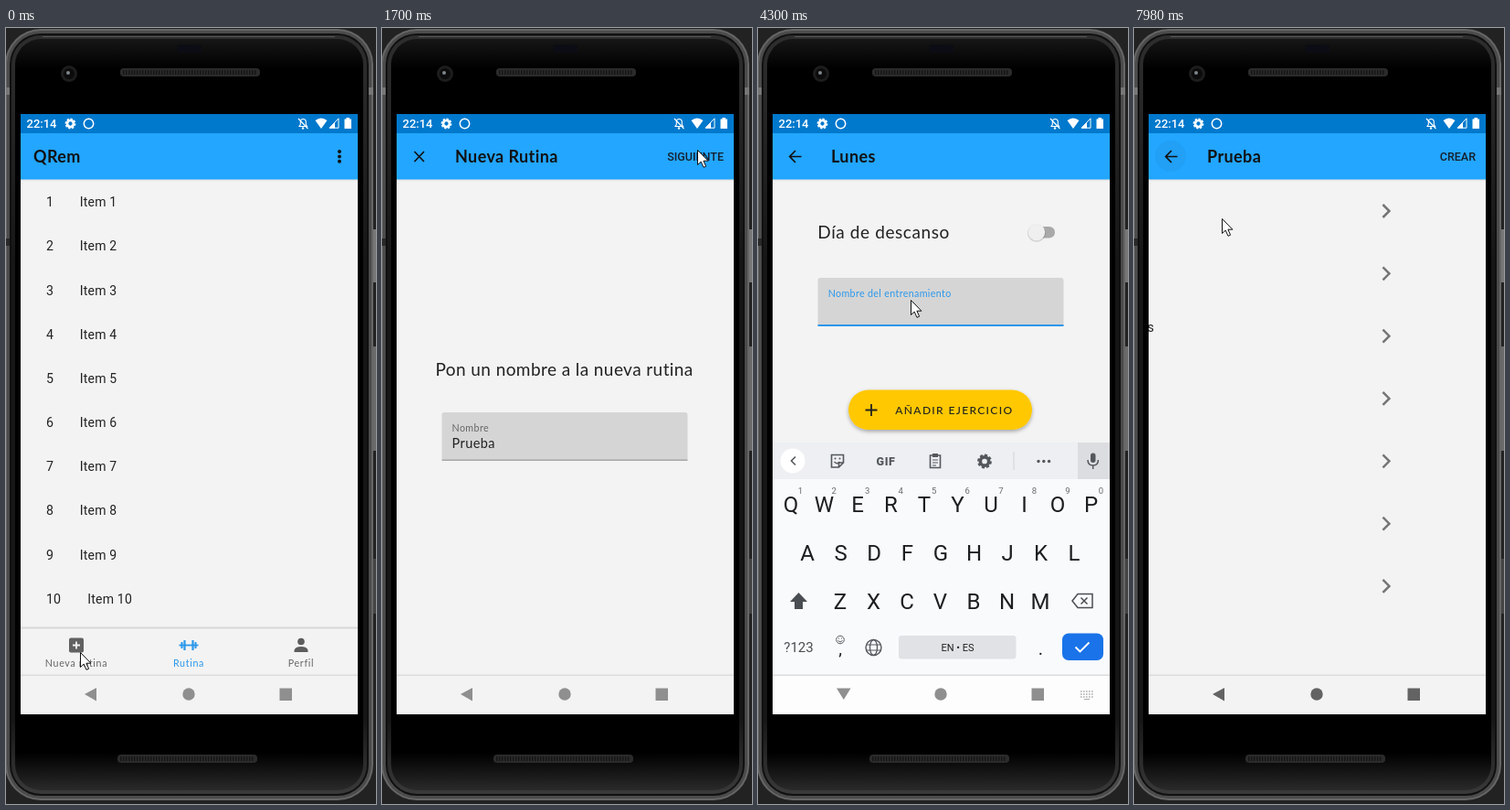
These frames come from a looping animation (405 by 848 pixels, 8 s). An HTML page:

```html
<!DOCTYPE html>
<html lang="es">
<head>
<meta charset="utf-8">
<title>Rutina</title>
<style>
html, body { margin: 0; width: 100%; height: 100%; overflow: hidden; background: #222; }
svg { display: block; width: 100%; height: 100%; }
text { white-space: pre; }
.r { font-family: Roboto, sans-serif; }
.m { font-family: Roboto, sans-serif; font-weight: 500; }
.l { font-family: Lato, sans-serif; }
.b { font-family: Lato, sans-serif; font-weight: 700; letter-spacing: .4px; }
</style>
</head>
<body>
<svg id="stage" viewBox="0 0 405 848"></svg>
<script>
const LOOP = 8000;
const BG = '#f3f3f3', BAR = '#22a6ff', STATUS = '#0078cc', BLUE = '#2b97ea', INK = '#222', GREY = '#666';

// Markup helpers
const rect = (x, y, w, h, fill, extra = '') =>
  `<rect x="${x}" y="${y}" width="${w}" height="${h}" fill="${fill}" ${extra}/>`;
const circ = (x, y, r, fill, extra = '') => `<circle cx="${x}" cy="${y}" r="${r}" fill="${fill}" ${extra}/>`;
const path = (d, fill, extra = '') => `<path d="${d}" fill="${fill}" ${extra}/>`;
const line = (d, color, w = 1.5, extra = '') => path(d, 'none', `stroke="${color}" stroke-width="${w}" ${extra}`);
const text = (x, y, s, size, cls = 'r', fill = INK, extra = '') =>
  `<text x="${x}" y="${y}" font-size="${size}" class="${cls}" fill="${fill}" ${extra}>${s}</text>`;
const mid = 'text-anchor="middle"';
const group = (id, body, extra = '') => `<g id="${id}" ${extra}>${body}</g>`;
const many = (n, fn) => Array.from({ length: n }, (_, i) => fn(i)).join('');
const gear = (x, y, r, color) =>
  circ(x, y, r * .58, 'none', `stroke="${color}" stroke-width="${r * .45}"`) +
  circ(x, y, r * .84, 'none', `stroke="${color}" stroke-width="${r * .3}" pathLength="16" stroke-dasharray="1.2 .8"`);
const appBar = () => rect(16, 165, 369, 3, 'url(#shade)') + rect(16, 115, 369, 50.5, BAR);

function phone() {
  const speaker = (x, y) => rect(x, y, 153, 9, '#2b2b2b', 'rx="4"') +
    line(`M${x + 3} ${y + 4.5}h147`, '#161616', 5, 'stroke-dasharray="1.5 1.5"');
  const shell = (inset, fill) =>
    rect(inset - 1, inset + 1, 403 - 2 * inset, 843 - 2 * inset, fill, `rx="${39 - inset}"`);
  return rect(0, 0, 405, 848, '#222') +
    rect(401, 220, 4, 58, '#777') + rect(401, 348, 4, 114, '#6a6a6a') + rect(401, 580, 4, 60, '#444') +
    shell(0, '#666') + shell(2, '#4b4b4b') +
    rect(0, 230, 5, 8, '#292929') + rect(0, 65, 5, 8, '#777') + rect(397, 65, 5, 8, '#777') +
    shell(5, '#101010') + shell(7, 'url(#glass)') + shell(11, 'url(#face)') +
    line('M40 9.5H360', '#555', 1.2) +
    speaker(125, 44) + speaker(122, 794) +
    rect(187, 18, 27, 9, '#0c0d14', 'rx="3"') +
    circ(69, 50, 9, '#1d1d1d') + circ(69, 50, 6, '#0b0b0b') + circ(68, 49, 2, '#7d878b');
}

function statusIcons() {
  return text(22.5, 109, '22:14', 13, 'm', '#fff') + gear(70.5, 104.5, 6, '#fff') +
    circ(90.5, 104.5, 5.2, 'none', 'stroke="#fff" stroke-width="1.5"') +
    path('M321 107.5h8.5l-1.2-2v-3q0-3-3-3t-3 3v3z', 'none', 'stroke="#fff" stroke-width="1.1"') +
    line('M320 99l10.5 11', '#fff', 1.2) + circ(325, 109.5, 1.2, '#fff') +
    path('M338.5 101q6.5-5 13 0l-6.5 9z', '#fff') +
    line('M364 98.8v10.4h-10z', '#fff', 1) + path('M360 103.5v6h-6z', '#fff') +
    path('M370.5 99.5h2v-1.5h3.5v1.5h2v10.5h-7.5z', '#fff');
}

function homeScreen() {
  const row = i => {
    const y = 195.3 + 48.15 * i;
    return text(44, y, i + 1, 14.2) + text(i < 9 ? 80.8 : 89.3, y, 'Item ' + (i + 1), 14, 'r', INK, 'letter-spacing=".2"');
  };
  const tab = (x, s, color) => text(x, 697.5, s, 10.7, 'l', color, mid + ' letter-spacing=".65"');
  return rect(16, 94, 369, 656, BG) + appBar() +
    text(30, 147, 'QRem', 18, 'b', '#111') + many(3, i => circ(365, 135 + i * 5.4, 2, '#111')) +
    many(10, row) + rect(16, 655, 369, 52, BG) + rect(16, 654.5, 369, 2, '#d8d8d8') +
    rect(69, 666.5, 16, 16, '#616161', 'rx="2"') + line('M77 670.5v8M73 674.5h8', BG, 1.8) +
    line('M189.500 674.500h21', BLUE, 1.8) +
    line('M192.500 671v7M207.500 671v7', BLUE, 2) + line('M195.500 669v11M204.500 669v11', BLUE, 2.2) +
    circ(323, 670.5, 3.8, '#5c5c5c') + path('M315.5 682v-2q1-4 7.5-4t7.5 4v2z', '#5c5c5c') +
    tab(77, 'Nueva rutina', GREY) + tab(200, 'Rutina', BLUE) + tab(323, 'Perfil', GREY);
}

const field = y => path(`M65.5 ${y + 52}v-49q0-3 3-3h263q3 0 3 3v49z`, '#d5d5d5');

const namePage = () => text(58.5, 380, 'Pon un nombre a la nueva rutina', 19, 'l', INK, 'letter-spacing=".42"') +
  field(420) + rect(65.5, 471.7, 269, 1, '#888') +
  text(76.5, 440.5, 'Nombre', 10.7, 'l', GREY, 'letter-spacing=".4"') +
  text(76.5, 458.5, 'Prueba', 14.5, 'l', INK, 'letter-spacing=".4"');

const weekPage = () => ['Lunes', 'Martes', 'Miércoles', 'Jueves', 'Viernes', 'Sábado', 'Domingo'].map((d, i) => {
  const y = 68.33 * i;
  return text(29.3, 195.3 + y, d, 14.4, 'r', INK, 'letter-spacing=".3"') +
    text(29.5, 215.5 + y, '-', 12.5, 'r', '#777') +
    line(`M345 ${193 + y}l7 7l-7 7`, '#757575', 2.5);
}).join('');

const dayPage = () => text(65.3, 229.5, 'Día de descanso', 19, 'l', INK, 'letter-spacing=".6"') +
  rect(299, 217, 26, 12.5, '#a9a9a9', 'rx="6.2"') +
  circ(305, 224, 10, '#000', 'opacity=".13"') + circ(305, 223, 9.2, '#efefef') +
  field(273) + group('edge', rect(65.5, 324.5, 269, 1, '#888')) + group('focus', rect(65.5, 324, 269, 2, BLUE)) +
  `<text id="label" class="l" font-size="10.7" letter-spacing=".35">Nombre del entrenamiento</text>` +
  `<text id="typed" class="l" x="76.5" y="311.8" font-size="14.5" letter-spacing=".3" fill="${INK}"></text>` +
  group('under', rect(76.5, 313.6, 42.5, 1, '#333')) +
  group('add', rect(99, 395.5, 201, 43.5, '#ffc800', 'rx="21.75" filter="url(#drop)"') +
    line('M124 411v13M117.5 417.5h13', INK, 1.8) +
    text(150.3, 422, 'AÑADIR EJERCICIO', 12, 'l', INK, 'letter-spacing="1.35" font-weight="500"'));

function keyboard() {
  const rows = [['qwertyuiop', 36, 528], ['asdfghjkl', 54, 581], ['zxcvbnm', 90, 634]];
  const letters = up => rows.map(([s, x, y]) => [...(up ? s.toUpperCase() : s)].map((c, i) =>
    text(x + i * 36.5, y + (up ? 1 : 0), c, 24, 'r', '#1d1e20', mid)).join('')).join('');
  const shift = 'M44.5 617l9.5 10h-5v8h-9v-8h-5z';
  const dark = '#54585d';
  const tools = line('M41 468.5l-4.5 4.5l4.5 4.5', dark, 1.6) +
    line('M80.5 466.5h13v8.5l-5 5h-8zM93.5 475h-5v5', dark, 1.6) +
    circ(84.5, 470.5, 1, dark) + circ(89.5, 470.5, 1, dark) + line('M83.5 474q3.5 3.5 6 0', dark, 1.3) +
    text(140, 477.5, 'GIF', 12.5, 'r', dark, mid + ' font-weight="900" letter-spacing=".6"') +
    line('M188.5 467h11v13.5h-11z', dark, 1.6) + rect(191, 465, 6, 4, dark) +
    line('M191 472h6M191 475h6M191 478h4', dark, 1) + gear(248, 473.5, 8, dark) +
    rect(279.5, 463, 1, 20, '#d2d5d8') + many(3, i => circ(307 + i * 5.8, 473.5, 1.7, dark));
  const hints = line('M36 468.5l4.5 4.5l-4.5 4.5', dark, 1.6) +
    [97, 199, 301].map(x => text(x, 479.5, '', 16, 'r', '#5a5d61', mid + ' data-hint=""')).join('') +
    rect(144.5, 462, 1, 22, '#c6c9cc') + rect(252.5, 462, 1, 22, '#c6c9cc');
  return rect(16, 453, 369, 254, '#f9fafc') + rect(16, 453, 369, 40, '#edeff2') + rect(350, 453, 35, 40, '#dcdde0') +
    circ(38, 473, 13.5, '#fff') + group('tools', tools) + group('hints', hints) +
    rect(364, 464.5, 5.5, 10.5, dark, 'rx="2.7"') + line('M361 472q0 6 5.7 6t5.7-6M366.7 478v4', dark, 1.5) +
    many(10, i => text(46.5 + i * 36.55, 508.5, (i + 1) % 10, 9.5, 'r', '#666a6e', mid)) +
    group('upper', letters(true) + path(shift, '#4a4d51')) +
    group('lower', letters(false) + line(shift, '#4a4d51', 1.5)) +
    line('M350 618.5h16v15h-16l-6-7.5zM353.5 622.5l7 7M360.5 622.5l-7 7', '#4a4d51', 1.5) +
    text(44.5, 682, '?123', 15, 'r', '#4a4d51', mid) +
    circ(90, 668.5, 4.3, 'none', `stroke="${dark}"`) + line('M87.5 669.5q2.5 3 5 0M88.5 666.5v1M91.5 666.5v1', dark, 1) +
    text(90, 685, ',', 19, 'r', INK, mid) +
    circ(126.5, 677, 8.5, 'none', `stroke="${dark}" stroke-width="1.4"`) +
    `<ellipse cx="126.5" cy="677" rx="4" ry="8.5" fill="none" stroke="${dark}" stroke-width="1.3"/>` +
    line('M119 674h15M119 680h15', dark, 1.2) +
    rect(154, 664, 128.5, 25.5, '#e1e2e5', 'rx="3"') + text(218.5, 681, 'EN • ES', 11, 'r', '#222', mid) +
    text(309.5, 685, '.', 20, 'r', INK, mid) +
    rect(333, 661.5, 45, 29.5, '#1a73e8', 'rx="7"') + line('M347.5 676.5l5 5l10-10', '#fff', 1.9);
}

const navBar = () => group('navBg', rect(16, 707, 369, 43, '#fdfdfd')) +
  group('navLine', rect(16, 706.5, 369, 1.5, '#dcdcdc')) +
  group('navIcons', path('M86 728l13-7v14.5z', '', 'id="back"') +
    path('M86 721.5h15.5l-7.7 12.5z', '', 'id="hide"') +
    '<circle cx="200" cy="728" r="6.7"/><rect x="299.5" y="721.5" width="13.5" height="13.5"/>') +
  group('kbIcon', many(3, i => line(`M353 ${725 + i * 3}h14`, '#aaa', 1.5, 'stroke-dasharray="1.6 1.4"')) +
    line('M357 733.5h6', '#aaa', 1));

const header = () => rect(16, 94, 369, 21, STATUS) + appBar() +
  group('close', line('M35.5 135l10.5 11M46 135l-10.5 11', '#111', 1.7)) +
  group('ripple', circ(40, 140, 17, '#000', 'opacity=".04"')) +
  group('arrow', line('M47.5 140.5h-12.5M41 134l-6.3 6.5l6.3 6.5', '#111', 1.7)) +
  `<text id="title" class="b" x="80" y="147" font-size="18" fill="#111"></text>` +
  `<text id="action" class="m" x="374" y="145" font-size="12.5" text-anchor="end" fill="#15202b"></text>`;

const clip = (id, y, h) => `<clipPath id="${id}"><rect x="16" y="${y}" width="369" height="${h}"/></clipPath>`;
const stage = document.getElementById('stage');
stage.innerHTML = `<defs>
  ${clip('screen', 94, 656)}${clip('body', 165, 542)}${clip('keys', 453, 254)}
  <linearGradient id="glass" x2="0" y2="1"><stop stop-color="#2e2e2e"/><stop offset=".3" stop-color="#161616"/>
    <stop offset=".9" stop-color="#161616"/><stop offset="1" stop-color="#3a3a3a"/></linearGradient>
  <linearGradient id="face" x2="0" y2="1"><stop stop-color="#161616"/><stop offset=".04"/>
    <stop offset=".95"/><stop offset="1" stop-color="#2a2a2a"/></linearGradient>
  <linearGradient id="shade" x2="0" y2="1"><stop stop-color="#dcdcdc"/><stop offset="1" stop-color="${BG}"/></linearGradient>
  <filter id="drop" x="-10%" y="-20%" width="120%" height="160%">
    <feDropShadow dx="0" dy="2" stdDeviation="2" flood-opacity=".33"/></filter></defs>` +
  phone() +
  group('screenBox', homeScreen() +
    group('flow', rect(16, 115, 369, 640, BG) +
      group('pages', group('name', namePage()) + group('week', weekPage()) + group('day', dayPage()), 'clip-path="url(#body)"') +
      header()) +
    rect(16, 94, 369, 21, STATUS, 'id="statusBg"') + statusIcons() +
    group('keyBox', group('kb', keyboard()), 'clip-path="url(#keys)"') + navBar(), 'clip-path="url(#screen)"') +
  group('pointer', circ(0, 0, 12, '#fbf75a', 'id="press" opacity=".85"') +
    path('M.5 .5V16.5l3.7-3.4l2.8 6.2l2.6-1.1l-2.7-6h5z', '#fff', 'stroke="#111" stroke-width="1"'));

const $ = Object.fromEntries([...stage.querySelectorAll('[id]')].map(e => [e.id, e]));
const hintNodes = stage.querySelectorAll('[data-hint]');

const ramp = (t, start, dur) => Math.min(1, Math.max(0, (t - start) / dur));
const ease = (t, start, dur = 400) => (1 - Math.cos(Math.PI * ramp(t, start, dur))) / 2;
const within = (t, spans) => spans.some(([a, b]) => t >= a && t < b);
const show = (e, on) => { e.style.display = on ? '' : 'none'; };
const move = (e, x, y) => e.setAttribute('transform', `translate(${x.toFixed(2)} ${y.toFixed(2)})`);

// Pointer route: time, x, y
const ROUTE = [[0, 81, 682], [600, 81, 682], [850, 107, 584], [1200, 240, 310], [1560, 345, 133], [1920, 345, 133],
  [2450, 149, 204], [2800, 149, 204], [3400, 167, 297], [5730, 167, 297], [5880, 202, 370], [6180, 85, 702],
  [6380, 79, 731], [6620, 79, 731], [7340, 40, 145], [7680, 40, 145], [7980, 96, 208], [LOOP, 96, 208]];
const PRESSES = [[320, 440], [1800, 1900], [2560, 2690], [3560, 3680], [6430, 6540], [7520, 7640]];
const TYPED_AT = [4400, 4490, 4600, 4720, 4890, 5080];
const HINTS = ['Por Para Pero', 'Pido Piso Pie', 'Pie Pies Piel', 'Pier Pierde Piel', 'Piern Pierna Piernas', 'Pierna Piernas Pierina'];

const OPEN = 694, TO_WEEK = 1870, TO_DAY = 2780, FOCUS = 3640, KB_IN = 3780, KB_OUT = 6580, TO_BACK = 7698;

function pointerAt(t) {
  const i = Math.max(1, ROUTE.findIndex(p => p[0] > t));
  const [a, b] = [ROUTE[i - 1], ROUTE[i]];
  const k = (t - a[0]) / (b[0] - a[0]);
  return [a[1] + (b[1] - a[1]) * k, a[2] + (b[2] - a[2]) * k];
}

function slide(e, on, x, alpha = 1) {
  show(e, on);
  move(e, x * 369, 0);
  e.setAttribute('opacity', alpha);
}

function render(t) {
  // Activity rises, then its pages slide sideways
  show($.flow, t >= OPEN);
  move($.flow, 0, 656 * (1 - ease(t, OPEN)));
  const a = ease(t, TO_WEEK), b = ease(t, TO_DAY), c = ease(t, TO_BACK);
  const returning = t >= TO_BACK;
  slide($.name, t < TO_WEEK + 400, -a, 1 - ramp(t, TO_WEEK, 250));
  slide($.week, t >= TO_WEEK && (t < TO_DAY + 400 || returning), returning ? c - 1 : 1 - a - b,
    returning ? 1 : 1 - ramp(t, TO_DAY, 250));
  slide($.day, t >= TO_DAY && t < TO_BACK + 250, 1 - b + c, 1 - ramp(t, TO_BACK, 200));

  const view = t < TO_WEEK ? 0 : t < TO_DAY || returning ? 1 : 2;
  $.title.textContent = ['Nueva Rutina', 'Prueba', 'Lunes'][view];
  $.action.textContent = ['SIGUIENTE', 'CREAR', ''][view];
  show($.close, view === 0);
  show($.arrow, view > 0);
  show($.ripple, t >= 7540);

  // Text field
  const focused = t >= FOCUS, up = ease(t, FOCUS, 150);
  show($.edge, !focused);
  show($.focus, focused);
  $.label.setAttribute('transform', `translate(76.7 ${304 - 10.5 * up}) scale(${1.35 - .35 * up})`);
  $.label.setAttribute('fill', focused ? BLUE : GREY);
  const count = TYPED_AT.filter(s => t >= s).length;
  $.typed.textContent = 'Pierna'.slice(0, count);
  show($.under, t >= 5270);

  // Keyboard and the button above it
  const kb = ease(t, KB_IN, 300) - ease(t, KB_OUT + 20, 250);
  const resized = t >= KB_IN && t < KB_OUT;
  show($.kb, kb > 0);
  move($.kb, 0, 254 * (1 - kb));
  move($.add, 0, resized ? 0 : 254);
  show($.tools, count === 0);
  show($.hints, count > 0);
  show($.upper, count === 0);
  show($.lower, count > 0);
  const words = HINTS[Math.max(0, (t < 5270 ? Math.min(count, 5) : count) - 1)].split(' ');
  hintNodes.forEach((n, i) => { n.textContent = words[i]; });

  show($.navBg, resized);
  show($.kbIcon, resized);
  show($.hide, resized);
  show($.back, !resized);
  show($.navLine, t < OPEN || t >= OPEN + 400);
  $.navIcons.setAttribute('fill', t >= KB_OUT ? '#636363' : '#8f8f8f');

  move($.pointer, ...pointerAt(t));
  show($.press, within(t, PRESSES));
}

const start = performance.now();
function tick() {
  render((performance.now() - start) % LOOP);
  requestAnimationFrame(tick);
}
tick();
</script>
</body>
</html>
```
